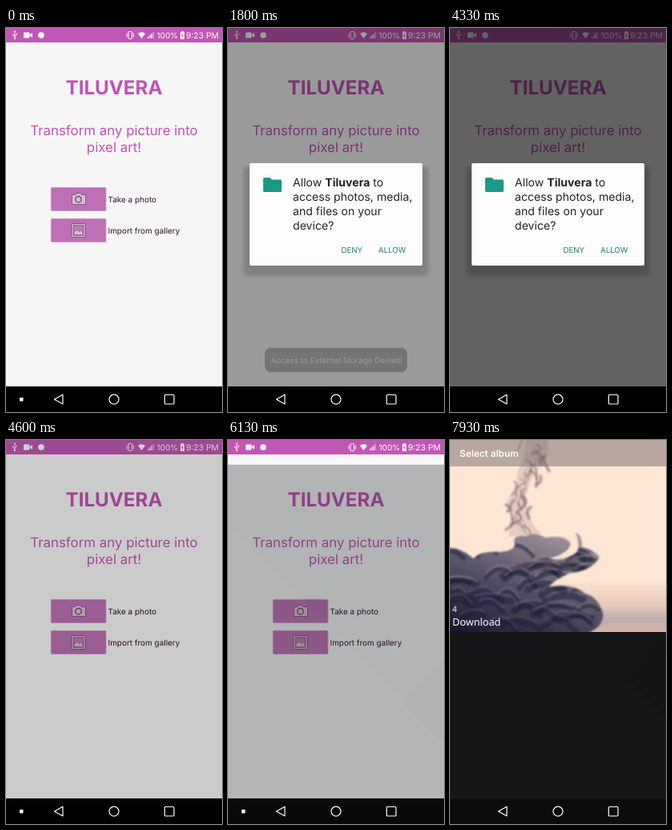
An HTML page for the animation above (8000 ms loop, 270 by 480 pixels).

```html
<!DOCTYPE html>
<html lang="en">
<head>
<meta charset="utf-8">
<title>Permission flow</title>
<style>
  html, body { margin: 0; width: 100%; height: 100%; overflow: hidden; background: #000; }
  svg {
    display: block; width: 270px; height: 480px;
    font: 9.95px Inter, Roboto, sans-serif; text-rendering: geometricPrecision;
  }
  .title { font-size: 24.2px; font-weight: 700; fill: #c252b6; text-anchor: middle; }
  .lead { font-size: 16.85px; fill: #c252b6; text-anchor: middle; }
  .label { fill: #35102f; }
  .ask { font-size: 14.1px; fill: #202224; }
  .ask tspan { font-weight: 700; }
  .action { font-size: 9.7px; fill: #1f7d74; }
  .line { fill: none; stroke: #fff; }
  .album { font-family: "Noto Sans", "Open Sans", sans-serif; fill: #fff; }
</style>
</head>
<body>
<svg viewBox="0 0 270 480">
  <defs>
    <filter id="soft" x="-20%" y="-20%" width="140%" height="140%"><feGaussianBlur stdDeviation="2.5"/></filter>
    <filter id="smoke" x="-20%" y="-20%" width="140%" height="140%"><feGaussianBlur stdDeviation="1.1"/></filter>
    <linearGradient id="sky" x2="0" y2="1">
      <stop offset=".72" stop-color="#fee6d5"/>
      <stop offset=".86" stop-color="#e9c9b9"/>
      <stop offset=".93" stop-color="#bfaeb0"/>
      <stop offset="1" stop-color="#d8b4a8"/>
    </linearGradient>
    <linearGradient id="ink" x1=".75" x2=".2" y2="1">
      <stop offset="0" stop-color="#a3959c"/>
      <stop offset=".45" stop-color="#5d576c"/>
      <stop offset="1" stop-color="#15172f"/>
    </linearGradient>
    <clipPath id="photoBox"><rect width="270" height="240"/></clipPath>
    <clipPath id="cloudBox"><use href="#cloud"/></clipPath>
  </defs>

  <!-- navigation backdrop -->
  <rect y="448" width="270" height="32"/>

  <g id="home">
    <rect width="270" height="448" fill="#f6f6f6"/>
    <rect width="270" height="18" fill="#c157b4"/>
    <g fill="#fff">
      <path class="line" d="M11 4.5V13M8.7 7.5V9.5L11 11M13.3 6.5V8.5L11 10" stroke-width=".9"/>
      <circle cx="11" cy="13" r="1.1"/>
      <path d="M11 3l1.4 2H9.6z"/>
      <rect x="22" y="5.5" width="7.5" height="7" rx="1"/>
      <path d="M29 9l4-3v6z"/>
      <circle cx="44" cy="9" r="3.8"/>
      <rect class="line" x="153" y="4.5" width="4.5" height="9" rx=".8"/>
      <path class="line" d="M151 6.5v5M159.5 6.5v5" stroke-width=".9"/>
      <path d="M165 7Q169.5 3.5 174 7L169.5 13z"/>
      <path d="M177 11h1.3v2H177zM179.2 9h1.3v4h-1.3zM181.4 7h1.3v6h-1.3z"/>
      <path d="M183.6 5h1.3v8h-1.3z" opacity=".5"/>
      <path d="M219.2 4h2.6v1h1.2v9h-5V5h1.2z"/>
      <path d="M220.8 6l-1.8 4h1.3l-.5 3 2-4h-1.3z" fill="#c157b4"/>
      <text x="188.5" y="12.8" font-size="10">100%</text>
      <text x="225" y="12.8" font-size="10.3">9:23 PM</text>
    </g>
    <text class="title" x="135" y="83">TILUVERA</text>
    <text class="lead" x="135" y="133.5">Transform any picture into</text>
    <text class="lead" x="135" y="154.5">pixel art!</text>
    <g fill="#bd70b5" stroke="#c98bc3" stroke-width=".8">
      <rect x="56.4" y="199.4" width="68.5" height="29" rx="1"/>
      <rect x="56.4" y="238.4" width="68.5" height="29" rx="1"/>
    </g>
    <g fill="#d9bcd5" stroke="#705069">
      <path d="M82.5 208.5h4l1.5-2h5l1.5 2h5v12h-17z" stroke-width=".8"/>
      <circle cx="90.5" cy="214.2" r="3.7" stroke-width="1.5"/>
      <rect x="82" y="244.5" width="17" height="17" rx="1" stroke-width=".9"/>
      <rect x="84.3" y="246.8" width="12.4" height="12.4" fill="#bd78b5" stroke-width=".8"/>
      <path d="M85 258.6v-3l3.5-3.5 3 2.5 2-1.5 2.6 2.5v3z" stroke-width=".6"/>
    </g>
    <text class="label" x="127.5" y="218">Take a photo</text>
    <text class="label" x="127.5" y="257">Import from gallery</text>
  </g>

  <g id="toast">
    <rect x="46" y="400" width="178" height="30" rx="7" fill="#616161"/>
    <text x="135" y="419.3" text-anchor="middle" fill="#f4f4f4">Access to External Storage Denied</text>
  </g>

  <rect id="dim" width="270" height="448"/>

  <g id="dialog">
    <rect x="20" y="174" width="230" height="136" rx="3" opacity=".17" filter="url(#soft)"/>
    <rect x="27" y="169" width="216" height="128" rx="2" fill="#fdfdfd"/>
    <path d="M45.5 187h7l2.5 2.5h10.500q1.500 0 1.500 1.500v12.500q0 1.500-1.500 1.500h-20q-1.500 0-1.500-1.500v-15q0-1.500 1.500-1.500z" fill="#1a9985"/>
    <g class="ask">
      <text x="81" y="198">Allow <tspan>Tiluvera</tspan> to</text>
      <text x="81" y="216">access photos, media,</text>
      <text x="81" y="234">and files on your</text>
      <text x="81" y="252">device?</text>
    </g>
    <text class="action" x="141.5" y="280.5">DENY</text>
    <text class="action" x="188" y="280.5">ALLOW</text>
  </g>

  <g id="gallery">
    <rect width="270" height="449" fill="#1a1c1f"/>
    <path d="M0 77L270 347V449H0z" fill="#1e2023"/>
    <path d="M219 296L270 243V347z" fill="#151618"/>
    <rect id="albums" width="270" height="449" fill="#141517"/>
  </g>
  <rect id="navTint" y="449" width="270" height="31" fill="#0b0c0d"/>

  <g id="photo" clip-path="url(#photoBox)">
    <rect width="270" height="240" fill="url(#sky)"/>
    <g filter="url(#smoke)" fill="none" stroke-linecap="round">
      <path d="M95 -5h26q6 22-10 40-12 14-16 36 0 30 20 46l-42 4q6-30-2-44 14-20 14-40 10-16 10-42z" fill="#c9ada9" opacity=".45"/>
      <g id="wisps" stroke="#75636f"></g>
      <path id="cloud" d="M-9 136q22-4 38 12 10-10 34-8 18-2 18-10-4-12 14-10 12-6 24 2 26-4 32 8-6 14-28 18 22 4 36-8 4-8-2-24 8 2 8 18 12 2 22 12-10 18-36 20-20 8-28 18 30-6 46 8 16 4 22 24 2 16-16 24-10 10-30 10H-9z" fill="url(#ink)"/>
      <g id="folds" clip-path="url(#cloudBox)"></g>
    </g>
  </g>
  <g id="caption">
    <rect width="270" height="33" fill="#645e5e" opacity=".46"/>
    <text x="12" y="21" font-size="11.8" font-weight="600" fill="#fff">Select album</text>
    <text class="album" x="3" y="214.5" font-size="10">4</text>
    <text class="album" x="3" y="232" font-size="12.7">Download</text>
  </g>

  <g class="line" stroke-width="1.2">
    <path d="M60.5 464.200L71 458.300V470z" stroke-linejoin="round"/>
    <circle cx="135" cy="464.2" r="6"/>
    <rect x="198.3" y="458.5" width="11.7" height="11.5" rx="1"/>
  </g>
  <rect id="dot" x="17" y="462" width="4.5" height="4.5" fill="#fff"/>
</svg>

<script>
  const LOOP = 8000;
  const SOFT_STOP = 'cubic-bezier(0, 0, .45, 1)';
  const $ = id => document.getElementById(id);

  let seed = 11;
  const rand = (lo, hi) => {
    seed = seed * 16807 % 2147483647;
    return lo + (hi - lo) * seed / 2147483647;
  };
  const draw = (id, count, shape) => {
    $(id).innerHTML = Array.from({ length: count }, (_, i) => shape(i / count, i)).join('');
  };

  // Thin curls that trail down the plume
  draw('wisps', 34, part => {
    const y = part * 110;
    const x = 108 - part * 28 + rand(-18, 18);
    return `<path d="M${x} ${y}q${rand(-14, 14)} ${rand(2, 10)} ${rand(-8, 8)} ${rand(8, 20)}"
      stroke-width="${rand(.8, 4)}" opacity="${rand(.25, .65)}"/>`;
  });

  // Rolled folds: a dark hollow under each pale rim
  draw('folds', 46, part => {
    const x = rand(0, 180);
    const y = 138 + part * 98;
    const width = rand(18, 48);
    const rise = rand(6, 20);
    const arc = `M${x - width / 2} ${y}q${width / 2} ${-rise} ${width} ${rand(-6, 10)}`;
    return `<path d="${arc}" stroke="#1d1f3b" stroke-width="${rand(4, 11)}" opacity=".5"/>
      <path d="${arc}" transform="translate(0 -5)" stroke="#9a8b95" stroke-width="2"
        opacity="${.55 - part * .35}"/>`;
  });

  // Each change is [start, end, value, easing]; values hold in between.
  function play(id, prop, first, ...changes) {
    let value = first;
    const frames = [{ offset: 0, [prop]: first }];
    for (const [start, end, next, easing = 'linear'] of changes) {
      frames.push({ offset: start / LOOP, [prop]: value, easing }, { offset: end / LOOP, [prop]: next });
      value = next;
    }
    frames.push({ offset: 1, [prop]: value });
    $(id).animate(frames, { duration: LOOP, iterations: Infinity });
  }
  const fade = (id, ...changes) => play(id, 'opacity', ...changes);

  fade('toast', 0, [900, 1400, 1], [1500, 2000, 0]);
  fade('dialog', 0, [1330, 1530, 1], [4420, 4590, 0]);
  fade('dim', 0, [1470, 2000, .6], [4430, 4800, 0, SOFT_STOP], [6130, 6270, .17]);
  fade('dot', 1, [1400, 1400, 0], [4530, 4530, 1], [6200, 6200, 0]);

  fade('gallery', 0, [6070, 6270, 1]);
  play('gallery', 'transform', 'translateY(38px)', [6050, 6320, 'translateY(0px)', 'ease-in-out']);
  fade('albums', 0, [6290, 6400, .75]);
  fade('navTint', 0, [6290, 6400, 1]);

  fade('caption', 0, [6900, 7070, 1]);
  fade('photo', 0, [6900, 7800, 1]);
</script>
</body>
</html>
```
